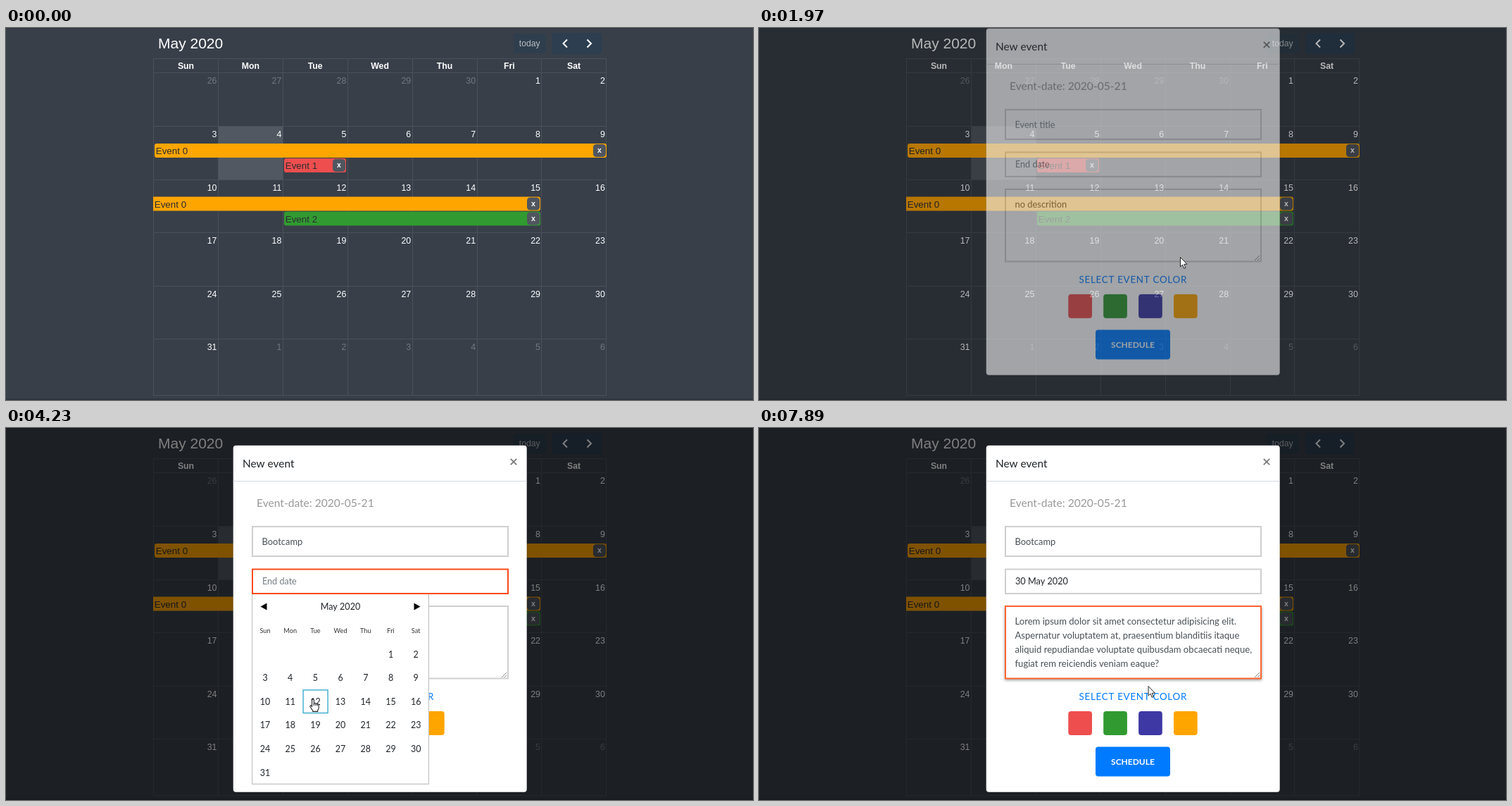
Write an HTML page with a canvas that moves like this. It is 1061 by 528 pixels and loops after 7.99 s.

```html
<!DOCTYPE html>
<html lang="en">
<head>
<meta charset="utf-8">
<title>Event calendar</title>
<style>
  html, body { margin: 0; width: 100%; height: 100%; overflow: hidden; background: #383f49; }
  canvas { display: block; }
</style>
</head>
<body>
<canvas id="stage" width="1061" height="528"></canvas>
<script>
const W = 1061, H = 528, LOOP = 7990;
const SANS = '"Liberation Sans", Arial, sans-serif';
const ROUND = 'Lato, "Open Sans", sans-serif';
const DAYS = ['Sun', 'Mon', 'Tue', 'Wed', 'Thu', 'Fri', 'Sat'];
const RED = '#ee4e4e', GREEN = '#319a31', INDIGO = '#3d38a4', ORANGE = '#ffa500', BLUE = '#007bff';
const ROWS = [63, 139, 215, 290, 366, 441, 521];
const LOREM = [
  'Lorem ipsum dolor sit amet consectetur adipisicing elit.',
  'Aspernatur voluptatem at, praesentium blanditiis itaque',
  'aliquid repudiandae voluptate quibusdam obcaecati neque,',
  'fugiat rem reiciendis veniam eaque?'
];

// Moments of the story, in ms
const T = {
  tipIn: 700, tipOut: 1180, pick: 1520, modal: 1886, focusTitle: 2600, type: 2750,
  openPicker: 3860, pickDate: 6060, focusNotes: 6750, dragEnd: 7200, paste: 7500
};
// Cursor hotspot: time, x, y
const PATH = [
  [40, 979, 512], [660, 533, 247], [960, 533, 247], [1100, 541, 260], [1430, 598.5, 325.5],
  [2150, 598.5, 325.5], [2490, 484.5, 174.5], [3430, 484.5, 174.5], [3740, 440, 218],
  [3900, 440, 218], [4130, 430, 378], [4230, 436, 385], [4600, 585, 453], [4920, 476, 453],
  [5070, 476, 453], [5400, 561, 453], [5800, 561, 453], [5960, 583, 451], [6100, 583, 451],
  [6550, 490, 283], [T.focusNotes, 490, 283], [T.dragEnd, 357, 274], [T.paste, 357, 274], [7830, 553, 366.5]
];
const CLICKS = [[T.pick, 1660], [2580, 2700], [3800, 3920], [6000, 6110], [6660, T.dragEnd]];
const EVENTS = [
  ['Event 0', 211, 164, 642, ORANGE, 3],
  ['Event 1', 395, 185, 88, RED, 3],
  ['Event 0', 209, 239.5, 550, ORANGE, [0, 3, 3, 0]],
  ['Event 2', 395, 260.5, 364, GREEN, 3]
];

const screen = document.getElementById('stage').getContext('2d');
const layer = document.createElement('canvas');
layer.width = W;
layer.height = H;
const layerCtx = layer.getContext('2d');
let g = screen;

const clamp = v => Math.max(0, Math.min(1, v));
const ramp = (t, from, span) => clamp((t - from) / span);
const within = (v, a, b) => v >= a && v < b;

function rect(x, y, w, h, color, r = 0) {
  g.fillStyle = color;
  g.beginPath();
  g.roundRect(x, y, w, h, r);
  g.fill();
}

// y is the middle of the capitals
function text(s, x, y, size, color, { font = ROUND, weight = 400, align = 'left', gap = 0 } = {}) {
  g.font = `${weight} ${size}px ${font}`;
  g.letterSpacing = gap + 'px';
  g.textAlign = align;
  g.fillStyle = color;
  g.fillText(s, x, y + size * 0.36);
  return g.measureText(s).width;
}

function poly(points, { fill, stroke, width = 1, close = true }) {
  g.beginPath();
  points.forEach(([x, y]) => g.lineTo(x, y));
  if (close) g.closePath();
  if (fill) { g.fillStyle = fill; g.fill(); }
  if (stroke) { g.strokeStyle = stroke; g.lineWidth = width; g.stroke(); }
}

function cursorAt(t) {
  let i = PATH.findIndex(k => k[0] > t);
  if (i < 0) i = PATH.length;
  const a = PATH[Math.max(0, i - 1)], b = PATH[Math.min(i, PATH.length - 1)];
  const p = b[0] > a[0] ? (t - a[0]) / (b[0] - a[0]) : 0;
  const e = p * p * (3 - 2 * p);
  return { x: a[1] + (b[1] - a[1]) * e, y: a[2] + (b[2] - a[2]) * e };
}

function cursorKind(t, { x, y }) {
  if (t < 2100) {
    return EVENTS.some(e => within(x, e[1], e[1] + e[3]) && within(y, e[2], e[2] + 20)) ? 'hand' : 'arrow';
  }
  if (within(t, T.openPicker, T.pickDate) && y > 236) return y > 304 ? 'hand' : 'arrow';
  const inField = within(x, 349, 714) && (within(y, 139, 183) || within(y, 200, 236) || within(y, 252, 356));
  return inField ? 'beam' : 'arrow';
}

function drawCalendar(t) {
  const opt = { font: SANS };
  const white = '#fff';
  rect(0, 0, W, H, '#383f49');
  rect(0, 0, W, 1, '#2e343d');
  rect(0, 526, W, 2, '#2e343d');
  text('May 2020', 216, 21.5, 21, white, opt);

  g.globalAlpha = 0.65;
  rect(721, 8, 46, 28, '#2c3e50', 3);
  text('today', 743.7, 21.5, 12.2, white, { font: SANS, align: 'center' });
  g.globalAlpha = 1;
  rect(776, 7, 70, 30, '#2c3e50', 3);
  for (const [x, d] of [[791.5, 5.5], [831, -5.5]]) {
    poly([[x + d, 16.5], [x, 22], [x + d, 27.5]], { stroke: white, width: 2, close: false });
  }

  rect(302, 140, 91, 75, '#515861');
  const line = '#4a515b';
  for (const y of [43, ...ROWS]) rect(209, y, 644, 1, line);
  for (let c = 0; c < 8; c++) rect(Math.round(209 + 91.9 * c), 43, 1, 478, line);
  DAYS.forEach((d, c) =>
    text(d, 255.5 + 91.85 * c, 53.5, 12.3, white, { font: SANS, weight: 700, align: 'center' }));

  for (let i = 0; i < 42; i++) {
    const day = i - 4, inMonth = within(day, 1, 32);
    const label = day < 1 ? day + 30 : inMonth ? day : day - 31;
    text(label, 299.5 + 91.9 * (i % 7), ROWS[i / 7 | 0] + 11.5, 12.4, inMonth ? white : '#737880',
      { font: SANS, align: 'right' });
  }
  if (within(t, T.pick, 1720)) rect(577, 291, 91, 75, 'rgba(188,232,241,.3)');

  for (const [name, x, y, w, color, r] of EVENTS) {
    rect(x, y, w, 20, color, r);
    text(name, x + 1.7, y + 10.2, 13.4, '#2b2d31', opt);
    rect(x + w - 19, y + 1, 18, 18, '#50565f', 4.5);
    text('x', x + w - 10, y + 9.3, 10.5, white, { font: SANS, weight: 700, align: 'center' });
  }
}

function drawTooltip(t) {
  const a = Math.min(ramp(t, T.tipIn, 150), 1 - ramp(t, T.tipOut, 150));
  if (a <= 0) return;
  const s = 0.88 + 0.12 * a;
  g.save();
  g.globalAlpha = a;
  g.translate(484, 218.5);
  g.scale(s, s);
  rect(-58, -12.5, 116, 25, '#333', 4);
  poly([[-6, 12.4], [6, 12.4], [0, 18]], { fill: '#333' });
  text('Just a regular event', 0, 0, 12.2, '#fff', { align: 'center' });
  g.restore();
}

function field(y, h, focused, glow) {
  g.save();
  if (focused && glow) {
    g.shadowColor = 'rgba(0,0,0,.4)';
    g.shadowBlur = 4;
    g.shadowOffsetY = 1.5;
  }
  rect(349, y, 365, h, focused ? (glow ? '#fb6530' : '#fb4a1c') : '#cfcfcf');
  g.restore();
  rect(351, y + 2, 361, h - 4, '#fff');
}

function drawTitleField(t) {
  const focused = within(t, T.focusTitle, T.openPicker);
  field(139, 44, focused, true);
  const n = t < T.type ? 0 : Math.floor((t - T.type) / 90) + 1;
  const typed = 'Bootcamp'.slice(0, n);
  const w = typed ? text(typed, 363.5, 161, 12.9, '#495057') : 0;
  if (!typed) text('Event title', 363.5, 161, 12.7, '#7d858c');
  const blink = t < T.type + 720 || (t - T.type) % 1000 < 500;
  if (focused && blink) rect(363.5 + w, 153, 1, 16, '#333');
}

function drawDateField(t) {
  field(199.5, 36.5, within(t, T.openPicker, T.focusNotes), false);
  if (t < T.pickDate) text('End date', 364, 217.5, 12.6, '#757d85');
  else text('30 May 2020', 364, 217.5, 12.7, '#212529');
}

function drawNotes(t, cur) {
  field(252, 104.5, t >= T.focusNotes, true);
  poly([[704, 354], [711, 347]], { stroke: '#888', close: false });
  poly([[708, 354], [711, 351]], { stroke: '#888', close: false });
  if (t >= T.paste) {
    LOREM.forEach((s, i) => text(s, 363.5, 274 + 20.1 * i, 13.1, '#495057'));
    return;
  }
  const s = 'no descrition';
  const end = 363.5 + text(s, 363.5, 274, 12.9, '#495057');
  if (t < T.focusNotes) return;
  const left = Math.max(363.5, cur.x);
  if (left >= end) {
    rect(end, 266, 1, 16, '#333');
    return;
  }
  g.save();
  g.beginPath();
  g.rect(left, 264, end - left, 19);
  g.clip();
  rect(left, 264, end - left, 19, '#0078d7');
  text(s, 363.5, 274, 12.9, '#fff');
  g.restore();
}

function drawPicker(t, cur) {
  if (!within(t, T.openPicker, T.pickDate)) return;
  rect(349, 236, 252, 270, '#c4c4c4');
  rect(350.2, 236, 249.6, 268.8, '#fff');
  poly([[361.5, 253.5], [370.5, 248.5], [370.5, 258.5]], { fill: '#000' });
  poly([[588.5, 253.5], [579.5, 248.5], [579.5, 258.5]], { fill: '#000' });
  const mid = { align: 'center' };
  text('May 2020', 475, 253.5, 12.6, '#212529', mid);
  DAYS.forEach((d, c) => text(d, 368 + 35.7 * c, 287.5, 9.2, '#333', mid));
  for (let day = 1; day <= 31; day++) {
    const i = day + 4;
    const x = 368 + 35.7 * (i % 7), y = 321 + 33.6 * (i / 7 | 0);
    if (Math.abs(cur.x - x) < 17.8 && Math.abs(cur.y - y) < 16.8) {
      g.strokeStyle = '#2fa5d0';
      g.lineWidth = 1.3;
      g.strokeRect(x - 17.3, y - 16.3, 35, 32.6);
    }
    text(day, x, y, 12.5, '#212529', mid);
  }
}

function drawModal(t, cur) {
  rect(322, 24, 418.5, 493.5, 'rgba(0,0,0,.2)', 5);
  rect(322.7, 24.7, 417, 492, '#fff', 4);
  text('New event', 336, 50, 15.4, '#212529');
  for (const d of [4.2, -4.2]) {
    poly([[721 - d, 43.8], [721 + d, 52.2]], { stroke: '#777', width: 1.7, close: false });
  }
  rect(322.7, 75, 417, 1, '#d5d9dd');
  text('Event-date: 2020-05-21', 356, 106.5, 15.6, '#999');
  drawTitleField(t);
  drawDateField(t);
  drawNotes(t, cur);
  text('SELECT EVENT COLOR', 531.3, 381, 13.4, BLUE, { align: 'center', gap: 0.7 });
  [RED, GREEN, INDIGO, ORANGE].forEach((c, i) => rect(439.3 + 49.9 * i, 402, 33.7, 34, c, 4));
  rect(478, 452.5, 106, 42, BLUE, 4);
  text('SCHEDULE', 531, 473.5, 12, '#fff', { weight: 700, align: 'center' });
  drawPicker(t, cur);
}

const SHAPES = {
  arrow() {
    poly([[0, 0], [0, 13.4], [3, 10.6], [5.3, 15.8], [7.4, 14.9], [5.2, 9.9], [9.4, 9.7]],
      { fill: '#fff', stroke: '#222' });
  },
  hand() {
    const p = new Path2D('M-1.4 .9Q0-.8 1.4 .9V6Q3 4.8 3.9 6.4Q5.5 5.4 6.2 7Q8.2 6.4 8.2 8.5V12' +
      'Q8.2 14 6.8 15.4V17.4H-.3V16Q-2.3 13.5-4 10.5Q-4.5 8.7-3 8.8L-1.4 10.4Z');
    g.fillStyle = '#fff';
    g.strokeStyle = '#222';
    g.lineWidth = 1.1;
    g.fill(p);
    g.stroke(p);
    g.stroke(new Path2D('M1.4 6V9M3.9 6.6V9M6.2 7.2V9.2'));
  },
  beam() {
    g.strokeStyle = '#111';
    g.lineWidth = 1.4;
    g.stroke(new Path2D('M-3.3-6.5H-1Q0-6.5 0-5.5V5.5Q0 6.5-1 6.5H-3.3M3.3-6.5H1Q0-6.5 0-5.5M0 5.5Q0 6.5 1 6.5H3.3'));
  }
};

function drawCursor(t, cur) {
  if (t < 40) return;
  g.save();
  g.translate(cur.x, cur.y);
  if (CLICKS.some(([a, b]) => within(t, a, b))) {
    g.fillStyle = 'rgba(255,241,40,.72)';
    g.beginPath();
    g.arc(-1, -1, 9.8, 0, 7);
    g.fill();
  }
  g.lineJoin = 'round';
  SHAPES[cursorKind(t, cur)]();
  g.restore();
}

function draw(t) {
  const cur = cursorAt(t);
  g = screen;
  drawCalendar(t);
  drawTooltip(t);
  const alpha = ramp(t, T.modal, 150);
  if (alpha > 0) {
    rect(0, 0, W, H, `rgba(0,0,0,${alpha / 2})`);
    g = layerCtx;
    g.clearRect(0, 0, W, H);
    drawModal(t, cur);
    g = screen;
    g.globalAlpha = alpha;
    g.drawImage(layer, 0, -42 * (1 - ramp(t, T.modal, 300)) ** 1.66);
    g.globalAlpha = 1;
  }
  drawCursor(t, cur);
}

function tick() {
  draw(performance.now() % LOOP);
  requestAnimationFrame(tick);
}
tick();
</script>
</body>
</html>
```
